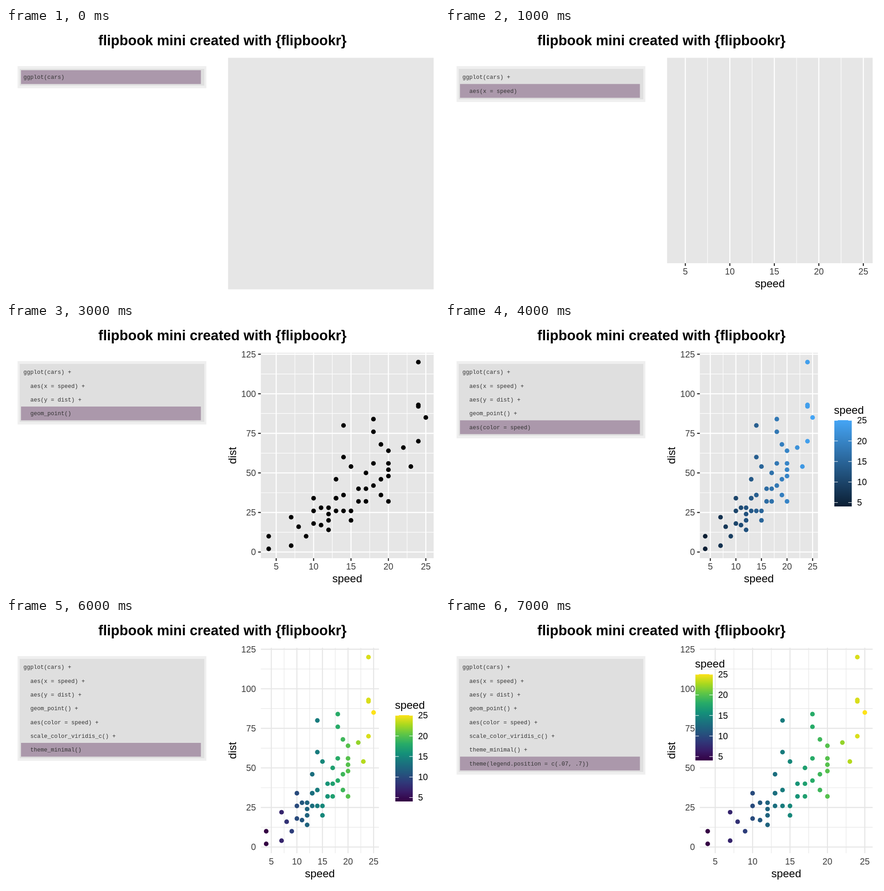
An HTML page for the animation above (8000 ms loop, 952 px wide and 588 px high).

```html
<!DOCTYPE html>
<html lang="en">
<head>
<meta charset="utf-8">
<title>flipbook mini</title>
<style>
html, body { margin: 0; width: 100%; height: 100%; overflow: hidden; background: #fff; }
svg { display: block; width: 952px; height: 588px; font-family: "Liberation Sans", Arial, sans-serif; }
.head { font-size: 30.9px; font-weight: bold; }
.code { font: 12.53px "Liberation Mono", "Courier New", monospace; fill: #333; white-space: pre; }
.tick { font-size: 19.3px; fill: #3d3d3d; }
.key { font-size: 19.3px; }
.name { font-size: 24.1px; }
</style>
</head>
<body>
<svg id="stage" viewBox="0 0 952 588"></svg>
<script>
const STEP = 1000;
const GREY = '#e6e6e6';
const BLUES = ['#0b1e33', '#45a5f5'];
const VIRIDIS = ['#340043', '#381c67', '#2f3979', '#23577e', '#1a727e',
  '#149079', '#27ab68', '#5dc547', '#a9d81e', '#fde219'];

const code = ['ggplot(cars)', 'aes(x = speed)', 'aes(y = dist)', 'geom_point()', 'aes(color = speed)',
  'scale_color_viridis_c()', 'theme_minimal()', 'theme(legend.position = c(.07, .7))'];

// The cars data: stopping distances by speed
const cars = {
  4: [2, 10], 7: [4, 22], 8: [16], 9: [10], 10: [18, 26, 34], 11: [17, 28],
  12: [14, 20, 24, 28], 13: [26, 34, 34, 46], 14: [26, 36, 60, 80], 15: [20, 26, 54],
  16: [32, 40], 17: [32, 40, 50], 18: [42, 56, 76, 84], 19: [36, 46, 68],
  20: [32, 48, 52, 56, 64], 22: [66], 23: [54], 24: [70, 92, 93, 120], 25: [85]
};

const wide = { left: 560.3, right: 940.3 };
const narrow = { left: 560.3, right: 820 };
const sideKey = { x: 856, y: 214 };
const plots = [
  { left: 488.3, right: 940.3, bottom: 575.5 },
  { left: 488.3, right: 940.3, x: true },
  { ...wide, x: true, y: true },
  { ...wide, x: true, y: true, points: true },
  { ...narrow, x: true, y: true, points: true, ramp: BLUES, key: sideKey },
  { ...narrow, x: true, y: true, points: true, ramp: VIRIDIS, key: sideKey },
  { ...narrow, x: true, y: true, points: true, ramp: VIRIDIS, key: sideKey, minimal: true },
  { ...wide, x: true, y: true, points: true, ramp: VIRIDIS, key: { x: 550.5, y: 123.7 }, minimal: true }
];

const stage = document.getElementById('stage');

function add(parent, tag, attrs, text) {
  const el = document.createElementNS('http://www.w3.org/2000/svg', tag);
  for (const k in attrs) el.setAttribute(k, attrs[k]);
  if (text !== undefined) el.textContent = text;
  return parent.appendChild(el);
}
const rect = (g, x, y, width, height, fill) => add(g, 'rect', { x, y, width, height, fill });
const line = (g, x1, y1, x2, y2, stroke, w) =>
  add(g, 'line', { x1, y1, x2, y2, stroke, 'stroke-width': w });
const label = (g, x, y, cls, text, anchor = 'start') =>
  add(g, 'text', { x, y, class: cls, 'text-anchor': anchor }, text);
const range = (from, to, by) =>
  Array.from({ length: Math.floor((to - from) / by) + 1 }, (_, i) => from + i * by);

function mix(ramp, t) {
  const pos = t * (ramp.length - 1);
  const i = Math.min(Math.floor(pos), ramp.length - 2);
  const part = (hex, k) => parseInt(hex.substr(1 + 2 * k, 2), 16);
  const rgb = [0, 1, 2].map(k =>
    Math.round(part(ramp[i], k) + (part(ramp[i + 1], k) - part(ramp[i], k)) * (pos - i)));
  return `rgb(${rgb})`;
}

function drawCode(g, last) {
  const row = 30.33, h = (last + 1) * row;
  rect(g, 25.5, 84, 415, h + 18.2, '#efefef');
  rect(g, 30, 90, 406, h + 6.4, '#dfdfdf');
  rect(g, 33, 93 + last * row, 395.5, row, '#ab98ab');
  for (let i = 0; i <= last; i++) {
    label(g, i ? 53.4 : 38.3, 112.3 + i * row, 'code', code[i] + (i < last ? ' +' : ''));
  }
}

function drawKey(g, { x, y }, ramp, id) {
  const w = 38.3, h = 190, unit = h / 21;
  const grad = add(g, 'linearGradient', { id, x1: 0, y1: 1, x2: 0, y2: 0 });
  ramp.forEach((c, i) => add(grad, 'stop', { offset: i / (ramp.length - 1), 'stop-color': c }));
  label(g, x - 0.8, y - 14.5, 'name', 'speed');
  rect(g, x, y, w, h, `url(#${id})`);
  for (const v of range(5, 25, 5)) {
    const ty = y + 0.5 + (25 - v) * unit;
    line(g, x, ty, x + w / 5, ty, '#fff', 1.1);
    line(g, x + w * 0.8, ty, x + w, ty, '#fff', 1.1);
    label(g, x + 50, ty + 6.9, 'key', v);
  }
}

function drawPlot(g, p, id) {
  const { left, right } = p, top = 65.6, bottom = p.bottom || 518;
  const grid = p.minimal ? GREY : '#fff';
  const px = v => left + (v - 2.95) / 23.1 * (right - left);
  const py = v => bottom - (v + 3.9) / 129.8 * (bottom - top);
  const vline = (v, w) => line(g, px(v), top, px(v), bottom, grid, w);
  const hline = (v, w) => line(g, left, py(v), right, py(v), grid, w);

  if (!p.minimal) rect(g, left, top, right - left, bottom - top, GREY);
  if (p.x) range(7.5, 22.5, 5).forEach(v => vline(v, 1.15));
  if (p.y) range(12.5, 112.5, 25).forEach(v => hline(v, 1.15));
  if (p.y) range(0, 125, 25).forEach(v => hline(v, 2.3));
  if (p.x) range(5, 25, 5).forEach(v => vline(v, 2.3));

  if (p.points) {
    for (const speed in cars) {
      const fill = p.ramp ? mix(p.ramp, (speed - 4) / 21) : '#000';
      for (const d of cars[speed]) add(g, 'circle', { cx: px(+speed), cy: py(d), r: 5.1, fill });
    }
  }
  if (p.x) {
    for (const v of range(5, 25, 5)) {
      if (!p.minimal) line(g, px(v), bottom, px(v), bottom + 6, '#252525', 2.3);
      label(g, px(v), 543.4, 'tick', v, 'middle');
    }
    label(g, (left + right) / 2, 571, 'name', 'speed', 'middle');
  }
  if (p.y) {
    for (const v of range(0, 125, 25)) {
      if (!p.minimal) line(g, left - 6, py(v), left, py(v), '#252525', 2.3);
      label(g, 549.5, py(v) + 6.9, 'tick', v, 'end');
    }
    label(g, 0, 0, 'name', 'dist', 'middle')
      .setAttribute('transform', `translate(506 ${(top + bottom) / 2}) rotate(-90)`);
  }
  if (p.key) drawKey(g, p.key, p.ramp, id);
}

label(stage, 476, 38.2, 'head', 'flipbook mini created with {flipbookr}', 'middle');
const pages = plots.map((p, i) => {
  const g = add(stage, 'g', { visibility: 'hidden' });
  drawCode(g, i);
  drawPlot(g, p, 'ramp' + i);
  return g;
});

const start = performance.now();
function show(now) {
  const page = Math.floor(Math.max(0, now - start) / STEP) % pages.length;
  pages.forEach((g, i) => g.setAttribute('visibility', i === page ? 'visible' : 'hidden'));
  requestAnimationFrame(show);
}
show(start);
</script>
</body>
</html>
```
